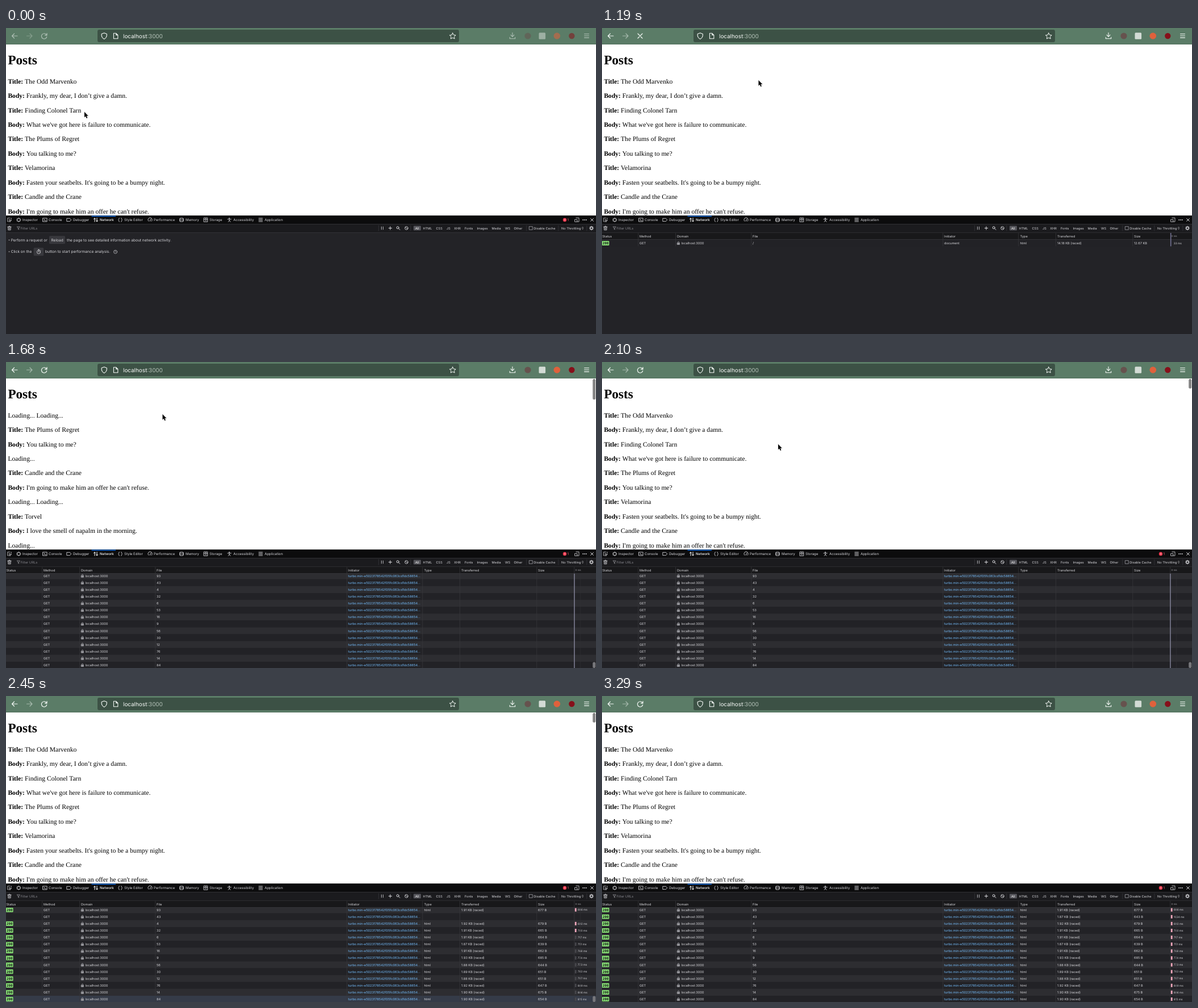
These frames come from a looping animation (1038 px wide and 539 px high, 3.36 s). An HTML page with a canvas:

```html
<!DOCTYPE html>
<html lang="en">
<head>
<meta charset="utf-8">
<title>Posts</title>
<style>
  html, body { margin: 0; width: 100%; height: 100%; overflow: hidden; background: #fff; }
  canvas { display: block; }
</style>
</head>
<body>
<canvas id="stage" width="1038" height="539"></canvas>
<script>
const ctx = document.getElementById('stage').getContext('2d');
const LOOP = 3360, STEP = 70;
const SANS = 'Inter, sans-serif', SERIF = '"Liberation Serif", serif', MONO = '"DejaVu Sans Mono", monospace';
const LIGHT = '#d7d7db', DIM = '#a5a5aa', LINE = '#38383d', BLUE = '#75bfff';

// ---- helpers: text is placed by its left edge and the middle of its capitals ----
function text(str, x, y, size, color, weight = 400, family = SANS) {
  ctx.font = `${weight} ${size}px ${family}`;
  ctx.fillStyle = color;
  ctx.fillText(str, x, y + size * (family === SERIF ? 0.33 : 0.364));
  return x + ctx.measureText(str).width;
}
function rect(x, y, w, h, color, radius = 0) {
  ctx.fillStyle = color;
  ctx.beginPath();
  ctx.roundRect(x, y, w, h, radius);
  ctx.fill();
}
function disc(x, y, r, color) { rect(x - r, y - r, 2 * r, 2 * r, color, r); }
function icon(path, x, y, color = LIGHT, width = 0.8, fill = false) {
  ctx.save();
  ctx.translate(x, y);
  ctx.lineWidth = width;
  ctx.strokeStyle = ctx.fillStyle = color;
  ctx.lineCap = ctx.lineJoin = 'round';
  const shape = new Path2D(path);
  if (fill) ctx.fill(shape);
  ctx.stroke(shape);
  ctx.restore();
}
const circle = r => `M${r} 0A${r} ${r} 0 1 1 ${-r} 0A${r} ${r} 0 1 1 ${r} 0Z`;
const clamp = v => Math.max(0, Math.min(1, v));
const mix = (a, b, k) => a + (b - a) * k;
const within = (t, a, b) => t >= a && t < b;

// ---- browser toolbar ----
function drawToolbar(t) {
  rect(0, 0, 1038, 29, '#5b7c67');
  rect(0, 28, 1038, 1, '#51705c');
  rect(161, 3, 636, 22, '#3c5145', 3);
  const glow = mix(0.55, 1, clamp((t - 420) / 210));
  const ink = '#f4f8f5';
  ctx.globalAlpha = glow;
  icon('M5 0H-4.5M-.5-4L-4.5 0L-.5 4', 15, 14, ink, 1.2);
  if (within(t, 1190, 1400)) icon('M-4-4L4 4M-4 4L4-4', 67, 14, ink, 1.2);
  else icon('M4.2-2.2A4.7 4.7 0 1 0 4.7 1.2M5-5V-1.5H1.5', 67, 14.3, ink, 1.2);
  icon('M0-6V1M-3-2L0 1.2L3-2M-4.7 2V4.6H4.7V2', 891, 14.2, ink, 1.1);
  icon('M-4-3.3H4M-4 0H4M-4 3.3H4', 1021.5, 13.8, ink, 1.1);
  disc(918, 14, 5.6, '#66524e');
  rect(937.5, 8.2, 11.6, 11.6, '#d3dbd5', 1.5);
  disc(969.3, 14, 5.8, '#e0613c');
  disc(995.3, 14, 5.2, '#86101a');
  ctx.globalAlpha = glow * 0.5;
  icon('M-5 0H4.5M.5-4L4.5 0L.5 4', 41.5, 14, ink, 1.2);
  ctx.globalAlpha = 1;
  icon('M0-5.3L4.6-3.4C5 1 3 4 0 5.5C-3 4-5 1-4.6-3.4Z', 172.7, 14, ink, 1.1);
  icon('M-3.6-4.7H.7L3.8-1.6V4.7H-3.6ZM.7-4.7V-1.6H3.8', 193, 14, ink, 1.1);
  icon('M0-5.3L1.7-1.8L5.4-1.3L2.7 1.3L3.4 5L0 3.2L-3.4 5L-2.7 1.3L-5.4-1.3L-1.7-1.8Z', 785.8, 14, ink, 1);
  const end = text('localhost', 206, 14, 9.9, '#fafcfa');
  text(':3000', end, 14, 9.9, '#b5c2b9');
}

// ---- web page: each post is [title, body, time it loads] ----
const POSTS = [
  ['The Odd Marvenko', 'Frankly, my dear, I don’t give a damn.', 1750],
  ['Finding Colonel Tarn', "What we've got here is failure to communicate.", 1890],
  ['The Plums of Regret', 'You talking to me?', 1680],
  ['Velamorina', "Fasten your seatbelts. It's going to be a bumpy night.", 2030],
  ['Candle and the Crane', "I'm going to make him an offer he can't refuse.", 1680],
  ['', '', 2170], ['', '', 2170],
  ['Torvel', 'I love the smell of napalm in the morning.', 1680],
  ['', '', 2170]
];
const EM = 11.574, LEFT = 3.4, FIRST = 94, PARAGRAPH = 25.42, LINE_HEIGHT = 13.88;
const serif = (str, x, y, weight, color = '#000') => text(str, x, y, EM, color, weight, SERIF);

function drawPage(t) {
  rect(0, 29, 1038, 302, '#fff');
  text('Posts', LEFT, 56.3, EM * 2, '#000', 700, SERIF);
  if (within(t, 1260, 1680)) {
    for (let row = 0; row < 5; row++) serif('Loading... '.repeat(20), LEFT, FIRST + row * LINE_HEIGHT);
    const y = FIRST + 5 * LINE_HEIGHT;
    const end = serif('New post', LEFT, y, 400, '#1f1550');
    rect(LEFT, y + 5, end - LEFT, 0.8, '#1f1550');
    return;
  }
  const lines = [];
  for (const [title, body, loadTime] of POSTS) {
    const last = lines[lines.length - 1];
    if (t < 1260 || t >= loadTime) lines.push(['Title:', title], ['Body:', body]);
    else if (last && !last[0]) last[1] += ' Loading...';
    else lines.push(['', 'Loading...']);
  }
  lines.slice(0, 10).forEach(([label, str], i) => {
    const y = FIRST + i * PARAGRAPH;
    const x = label ? serif(label + ' ', LEFT, y, 700) : LEFT;
    serif(str, x, y);
  });
}

// ---- developer tools: bars ----
const TABS = [
  ['Inspector', 29, 22.5, 'M-2.4-2.4H2.4V2.4H-2.4ZM-3.6 0H-2.4M2.4 0H3.6M0-3.6V-2.4M0 2.4V3.6'],
  ['Console', 75, 68.5, 'M-3.6-3H3.6V3H-3.6ZM-1.8-1.2L-.4 0L-1.8 1.2M.5 1.3H1.8'],
  ['Debugger', 118, 111, 'M-3.8-2.6H1.4L3.8 0L1.4 2.6H-3.8Z'],
  ['Network', 165, 158, 'M-2 3.2V-3M-3.6-1.3L-2-3L-.4-1.3M2-3.2V3M.4 1.3L2 3L3.6 1.3'],
  ['Style Editor', 208, 201, 'M-1.5-3.3C-3.3-3.3-1.8-.4-3.5 0C-1.8.4-3.3 3.3-1.5 3.3M1.5-3.3C3.3-3.3 1.8-.4 3.5 0C1.8.4 3.3 3.3 1.5 3.3'],
  ['Performance', 260, 253.5, 'M-2.8 2.3A3.7 3.7 0 1 1 2.8 2.3M0 1.2L1.6-1.6M-.6 1.8H.6'],
  ['Memory', 316, 309, 'M-2.4-3H2.4V3H-2.4ZM-3.7-1.6H-2.4M-3.7 0H-2.4M-3.7 1.6H-2.4M2.4-1.6H3.7M2.4 0H3.7M2.4 1.6H3.7M0-1.2V1.2'],
  ['Storage', 358, 351.5, 'M-3.2-3.4H3.2V3.4H-3.2ZM-3.2-.6H3.2M-1-2H1M-1 1.2H1'],
  ['Accessibility', 400, 393, 'M-.5-3.2H.5V-2.5H-.5ZM-3.2-1.2H3.2M0-1V.8M-1.8 3.4L0 .8L1.8 3.4'],
  ['Application', 455, 448, 'M-3.2-3H-1.6M-.8-3H.8M1.6-3H3.2M-3.2-1H-1.6M-.8-1H.8M1.6-1H3.2M-3.2 1H-1.6M-.8 1H.8M1.6 1H3.2M-3.2 3H-1.6M-.8 3H.8M1.6 3H3.2']
];
const FILTERS = [['All', 720], ['HTML', 733.5], ['CSS', 756.5], ['JS', 775], ['XHR', 788.3], ['Fonts', 807],
  ['Images', 828.5], ['Media', 854.5], ['WS', 878], ['Other', 893.5]];

function drawDevtoolsBars(t) {
  rect(0, 330.5, 1038, 209, '#232327');
  rect(0, 330.5, 1038, 15, '#0c0c0d');
  rect(0, 345.5, 1038, 15, '#1b1b1e');
  rect(0, 345, 1038, 0.7, LINE);
  rect(0, 360, 1038, 0.7, LINE);
  rect(150.5, 330.7, 42.5, 1.5, '#0a6ae0');

  icon('M1-3.2H-3.2V3H-.8M3.2-3.2V-1M-.2-.4L3.6 1L1.9 1.7L1.1 3.5Z', 6, 338);
  TABS.forEach(([label, x, iconX, path]) => {
    const active = label === 'Network', color = active ? '#fff' : LIGHT;
    icon(path, iconX, 338, color, active ? 1 : 0.85);
    text(label, x, 338, 6.05, color, active ? 500 : 400);
  });
  if (!within(t, 1190, 1680)) {
    disc(983, 338, 3.2, '#f0384e');
    text('!', 982.2, 338, 5, '#fff', 700);
    text('1', 987.6, 338, 6, '#ff6b7d');
  }
  icon('M-1.6-3.5H3.5V3.2H.4M-3.5-.6H.3V3.4H-3.5Z', 1004.5, 338);
  [-2.8, 0, 2.8].forEach(dx => disc(1018 + dx, 338, 0.9, LIGHT));
  icon('M-2.4-2.4L2.4 2.4M-2.4 2.4L2.4-2.4', 1031, 338, LIGHT, 1);

  icon('M-3.2-2.2H3.2M-1-2.2V-3.4H1V-2.2M-2.4-2.2L-2.1 3.4H2.1L2.4-2.2M-.8-.6V2M.8-.6V2', 6, 352.5);
  icon('M-2.4-2.4H2.4L.7 0V2.6L-.7 1.8V0Z', 22, 352.5, DIM, 0.7);
  text('Filter URLs', 25.5, 352.5, 5.8, '#85858a');
  icon('M-1.5-2.4V2.4M1.5-2.4V2.4', 662, 352.5);
  icon('M-2.7 0H2.7M0-2.7V2.7', 676, 352.5, LIGHT, 1);
  icon('M1.2-.8A2 2 0 1 1-2.8-.8A2 2 0 1 1 1.2-.8ZM.7.7L3 3', 690, 352.5, LIGHT, 1);
  icon(circle(2.8) + 'M-2-2L2 2', 704.5, 352.5, LIGHT, 0.9);
  rect(717, 348.5, 13, 8, '#55555b', 1);
  FILTERS.forEach(([label, x]) => text(label, x, 352.5, 5.6, label === 'All' ? '#fff' : LIGHT));
  icon('M-2.8-2.8H2.8V2.8H-2.8Z', 923.5, 352.5, '#b5b5ba', 0.7);
  text('Disable Cache', 928.3, 352.5, 5.6, LIGHT);
  text('No Throttling', 977, 352.5, 5.6, LIGHT);
  icon('M-1.1-.7L0-1.9L1.1-.7M-1.1.7L0 1.9L1.1.7', 1014.5, 352.5, LIGHT, 0.7);
  [655, 711.5, 915.5, 971.5, 1021.5].forEach(x => rect(x, 347.5, 0.7, 10, LINE));
  icon(circle(2.1) + 'M0-3.4V-2.4M0 2.4V3.4M-3.4 0H-2.4M2.4 0H3.4M-2.4-2.4L-1.7-1.7M1.7 1.7L2.4 2.4M-2.4 2.4L-1.7 1.7M1.7-1.7L2.4-2.4', 1030, 352.5, LIGHT, 1.2);
}

function drawEmptyPanel() {
  const size = 6.55;
  disc(5.5, 373.5, 0.8, LIGHT);
  text('Perform a request or', 8.7, 373.5, size, LIGHT);
  rect(76, 366.3, 28, 14, '#38383d', 1.5);
  text('Reload', 79.5, 373.5, size, LIGHT);
  text('the page to see detailed information about network activity.', 107, 373.5, size, LIGHT);
  disc(5.5, 394, 0.8, LIGHT);
  text('Click on the', 8.7, 394, size, LIGHT);
  rect(48.7, 387, 17.5, 14.3, '#38383d', 1.5);
  icon(circle(3) + 'M0 0V-1.6M-1-4.2H1M2.6-3.2L3.2-2.6', 57.5, 394.6, LIGHT, 0.9);
  text('button to start performance analysis.', 69, 394, size, LIGHT);
  icon(circle(3), 192.5, 394.3, LIGHT, 0.7);
  text('?', 191, 394.3, 5, LIGHT);
}

// ---- developer tools: request table ----
const ROW = 12.1, CELL = 5.65;
const COLUMNS = [['Status', 0.5], ['Method', 66], ['Domain', 132], ['File', 265], ['Initiator', 602],
  ['Type', 735.5], ['Transferred', 801], ['Size', 936]];
const DIVIDERS = [63.5, 129, 262.5, 599.5, 732.5, 798, 933.5, 999.5];
const SHIMS = 'es-module-shims.min-b8099fffdbd758070d4…';
const TURBO = 'turbo.min-e5023178542f05fc063cd1dc58654…';
// file, size, and where they differ from a cached script: initiator, type
const ASSETS = [
  ['/', '12.67 KB', 'document', 'html'],
  ['es-module-shims.min-b8099fffdbd758070d4801321d43b389c5b6174a50782f9f4cb57061533b7ac2.js', '0 B', 'script'],
  ['application-37f365cbecf1fa2810a8303f4b6571676fa1f9c56c249528bc14ddb857531b95.js', '158 B'],
  ['turbo.min-e5023178542f05fc063cd1dc5865457259cc01f3fba76a28454060d33de6f429.js', '72.89 KB'],
  ['stimulus.min-900648768bd96f3faeba359cf33c1bd01ca424ca4d2d05f36a5d8345112ae93c.js', '32.42 KB'],
  ['stimulus-loading-1fc59770fb1654500044afd3f5f6d7d00800e5be36746d55b94a2963a7a228aa.js', '3.17 KB'],
  ['favicon.ico', '0 B', 'FaviconLoader.jsm:191', 'vnd.microsoft.icon'],
  ['index-2db729dddcc5b979110e98de4b6720f83f91a123172a87281d5a58410fc43806.js', '585 B'],
  ['application-368d98631bccbf2349e0d4f8269afb3fe9625118341966de054759d96ea86c7e.js', '219 B']
];
// file, transferred KB, size in bytes, duration in ms
const FETCHES = [
  [93, 1.91, 677, 686], [43, 1.87, 643, 1024], [4, 1.92, 679, 692], [32, 1.91, 665, 700], [6, 1.91, 664, 717],
  [53, 1.87, 639, 751], [16, 1.91, 662, 768], [9, 1.93, 685, 774], [56, 1.88, 644, 773], [30, 1.89, 651, 783],
  [12, 1.88, 651, 797], [76, 1.92, 647, 809], [14, 1.90, 675, 806], [84, 1.90, 654, 815]
];

function drawRow(y, background, file, initiator, linked) {
  rect(0, y - ROW / 2, 1038, ROW, background);
  text('GET', 66, y, CELL, LIGHT);
  icon('M-1.9-.4H1.9V2.4H-1.9ZM-1.2-.4V-1.5A1.2 1.2 0 0 1 1.2-1.5V-.4', 134.5, y, '#97979c', 0.9, false);
  rect(132.4, y - 0.4, 4.2, 3, '#97979c');
  text('localhost:3000', 139.5, y, CELL, LIGHT);
  text(file, 265, y, CELL, LIGHT);
  return text(initiator, 602, y, CELL, linked ? BLUE : LIGHT);
}
function drawResponse(y, type, transferred, size, duration, fresh) {
  ctx.globalAlpha = fresh ? 1 : 0.7;
  rect(0, y - 4, 12.6, 8, '#86de74', 1);
  ctx.globalAlpha = 1;
  text('200', 1, y, 5.8, '#18181a', 700, MONO);
  text(type, 735.5, y, CELL, LIGHT);
  text(transferred, 801, y, CELL, LIGHT);
  text(size, 936, y, CELL, LIGHT);
  text(duration + ' ms', 1005.8, y, 4.75, LIGHT);
}
function drawHeader() {
  rect(0, 360.7, 1038, 11.5, '#18181a');
  rect(0, 372, 1038, 0.7, LINE);
  COLUMNS.forEach(([label, x]) => text(label, x, 366.6, CELL, LIGHT));
  text('0 ms', 1001.5, 366.6, 4.4, DIM);
}
const stripe = index => index % 2 ? '#2d2d31' : '#222226';

function drawAssets(t) {
  const count = Math.min(ASSETS.length, 1 + Math.floor((t - 1190) / 30));
  ASSETS.slice(0, count).forEach(([file, size, initiator = SHIMS, type = 'js'], i) => {
    const y = 379 + i * ROW, icoFile = i === 6;
    const end = drawRow(y, stripe(i), file, initiator, initiator === SHIMS || icoFile);
    if (icoFile) text(' (img)', end, y, CELL, LIGHT);
    drawResponse(y, type, i ? 'cached' : '14.18 KB (raced)', size, i ? 0 : 33, !i);
  });
  const height = 372.5 + count * ROW;
  DIVIDERS.forEach(x => rect(x, 361, 0.7, height - 361, LINE));
  rect(1000.2, 361, 1.2, height - 361, '#8583ad');
}

function drawFetches(t) {
  const pointer = cursorAt(t - 10);
  const hovered = within(t, 2240, 2660) ? Math.min(13, Math.floor((pointer[1] - 370.5) / ROW)) : -1;
  FETCHES.forEach(([file, kb, bytes, ms], i) => {
    const y = 376.7 + i * ROW, doneAt = 1550 + ms;
    drawRow(y, i === hovered ? '#353b48' : stripe(i + 1), file, TURBO, true);
    if (t < doneAt) return;
    drawResponse(y, 'html', kb.toFixed(2) + ' KB (raced)', bytes + ' B', ms, true);
    rect(1000.8, y - 3, 2.8, 6, t >= doneAt + 200 ? '#f3a9bd' : '#48484d');
  });
  DIVIDERS.forEach(x => rect(x, 361, 0.7, 178, LINE));
  rect(1010, 372, 0.6, 167, '#303035');
  if (t < 2170) rect(999.3, 361, 1.3, 178, '#8d8da6');
  drawHeader();
  DIVIDERS.forEach(x => rect(x, 361, 0.7, 11, LINE));
}

function drawScrollbars(t) {
  ctx.globalAlpha = clamp((3290 - t) / 280);
  rect(1032.2, 29.8, 5, mix(36.5, 17, clamp((t - 1680) / 420)), '#858585', 2.5);
  rect(1032.2, 528.5, 5, 10.5, '#77777b', 2.5);
  ctx.globalAlpha = 1;
}

// ---- mouse pointer: [time, x, y] ----
const POINTER = [[0, 138, 148], [140, 150, 143], [280, 215, 117], [420, 266, 96], [490, 275.5, 92.3], [2030, 275.5, 92.3],
  [2100, 310, 145], [2170, 375, 245], [2240, 450, 375], [2310, 512.5, 475], [2380, 540, 522], [2450, 555, 545]];
function cursorAt(t) {
  const next = POINTER.findIndex(p => p[0] > t);
  if (next < 0) return POINTER[POINTER.length - 1].slice(1);
  const a = POINTER[Math.max(0, next - 1)], b = POINTER[next];
  const k = clamp((t - a[0]) / (b[0] - a[0] || 1));
  return [mix(a[1], b[1], k), mix(a[2], b[2], k)];
}
function drawCursor(t) {
  const [x, y] = cursorAt(t);
  if (y > 539) return;
  if (within(t, 1330, 1680)) {
    icon('M-1.8-4.7Q0-4.7 0-3.3V3.3Q0 4.7-1.8 4.7M1.8-4.7Q0-4.7 0-3.3M0 3.3Q0 4.7 1.8 4.7M-1 1H1', x - 0.3, 91, '#111', 0.9);
    return;
  }
  const arrow = 'M0 0V9.2L2.1 7.3L3.7 10.9L5.2 10.2L3.7 6.7H6.5Z';
  icon(arrow, x, y, '#fff', 1.6);
  icon(arrow, x, y, '#000', 0.2, true);
}

function draw(t) {
  drawPage(t);
  drawToolbar(t);
  drawDevtoolsBars(t);
  if (t < 1190) drawEmptyPanel();
  else if (t < 1680) { drawHeader(); drawAssets(t); }
  else { drawFetches(t); drawScrollbars(t); }
  drawCursor(t);
}

ctx.textRendering = 'geometricPrecision';
const start = performance.now();
function tick() {
  const t = (performance.now() - start) % LOOP;
  draw(Math.floor(t / STEP) * STEP);
  requestAnimationFrame(tick);
}
tick();
</script>
</body>
</html>
```
